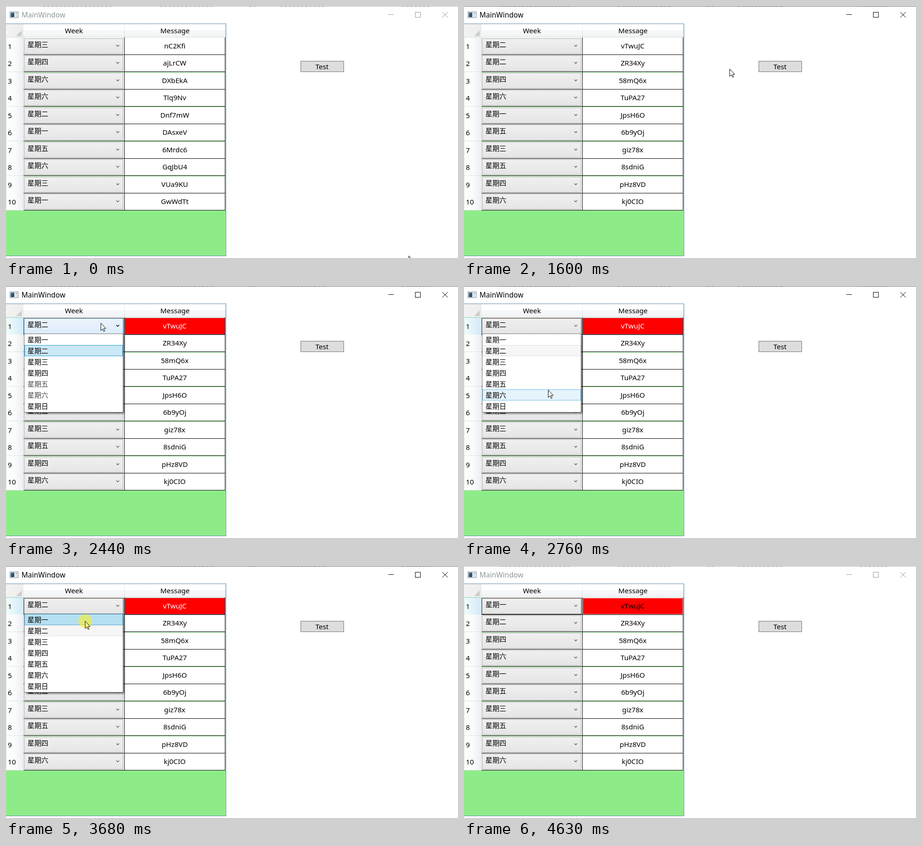
An HTML page with a canvas for the animation above (4.7 s loop, 979 by 546 pixels).

```html
<!DOCTYPE html>
<html lang="zh">
<head>
<meta charset="utf-8">
<title>MainWindow</title>
<style>
html, body { margin: 0; width: 100%; height: 100%; overflow: hidden; background: #fff; }
canvas { display: block; width: 979px; height: 546px; }
</style>
</head>
<body>
<canvas id="stage"></canvas>
<script>
const W = 979, H = 546, LOOP = 4700;
const canvas = document.getElementById('stage');
const ctx = canvas.getContext('2d');
const dpr = window.devicePixelRatio || 1;
canvas.width = W * dpr;
canvas.height = H * dpr;

const LATIN = '15.2px "Noto Sans", "Open Sans", sans-serif';
const CJK = '15px "Noto Sans CJK SC", "Noto Sans CJK", sans-serif';
const DAYS = '一二三四五六日';
const DATA = [
  { days: '三四六六二一五六三一', msgs: 'nC2Kfi ajLrCW DXbEkA Tlq9Nv Dnf7mW DAsxeV 6Mrdc6 GqJbU4 VUa9KU GwWdTt'.split(' ') },
  { days: '日一一二二四五三六一', msgs: 'PVe2Ov 8j2m7j 0yQnLj zqdDyz as3XVt ATTaqc q8xRcW SMuLsd Y2GPiW sFd6gY'.split(' ') },
  { days: '二二四六一五三五四六', msgs: 'vTwuJC ZR34Xy 58mQ6x TuPA27 JpsH6O 6b9yOj giz78x 8sdniG pHz8VD kj0CIO'.split(' ') }
];

// The screen refreshes in bursts: [first, last, count]
const BURSTS = [[0, 0, 1], [70, 500, 7], [650, 730, 2], [1280, 1280, 1], [1430, 1890, 7],
  [1980, 2440, 7], [2530, 2990, 7], [3140, 3300, 3], [3680, 4000, 5], [4630, 4630, 1]];
const TICKS = BURSTS.flatMap(([a, b, n]) =>
  Array.from({ length: n }, (_, i) => n > 1 ? Math.round((a + (b - a) * i / (n - 1)) / 10) * 10 : a));

// Pointer track: [time, x, y]
const TRACK = [[0, 872, 541], [140, 822, 420], [290, 730, 215], [430, 684, 142], [500, 680, 136],
  [1430, 680, 136], [1580, 575, 136], [1600, 575, 136], [1890, 370, 112], [2130, 220, 84], [2280, 205, 78],
  [2440, 205, 80], [2530, 203, 96], [2680, 188, 195], [2760, 182, 225], [2990, 175, 136],
  [3140, 174, 132], [3300, 171, 119], [3770, 171, 119], [4000, 602, 339]];

function pointer(t) {
  for (let i = 1; i < TRACK.length; i++) {
    const [t0, x0, y0] = TRACK[i - 1], [t1, x1, y1] = TRACK[i];
    if (t <= t1) {
      const k = (t - t0) / (t1 - t0);
      return { x: Math.round(x0 + (x1 - x0) * k), y: Math.round(y0 + (y1 - y0) * k) };
    }
  }
  const [, x, y] = TRACK[TRACK.length - 1];
  return { x, y };
}

const within = (t, a, b) => t >= a && t < b;
const inside = (p, x, y, w, h) => p.x >= x && p.x < x + w && p.y >= y && p.y < y + h;

function fill(x, y, w, h, color) {
  ctx.fillStyle = color;
  ctx.fillRect(x, y, w, h);
}

function box(x, y, w, h, color, border) {
  fill(x, y, w, h, color);
  ctx.strokeStyle = border;
  ctx.lineWidth = 1;
  ctx.strokeRect(x + .5, y + .5, w - 1, h - 1);
}

function ramp(x0, y0, x1, y1, ...colors) {
  const g = ctx.createLinearGradient(x0, y0, x1, y1);
  colors.forEach((c, i) => g.addColorStop(i / (colors.length - 1), c));
  return g;
}

function text(s, x, y, color = '#000', align = 'left', font = LATIN) {
  ctx.font = font;
  ctx.textAlign = align;
  ctx.fillStyle = color;
  ctx.fillText(s, x, y);
}

function lines(color, width, ...paths) {
  ctx.strokeStyle = color;
  ctx.lineWidth = width;
  ctx.beginPath();
  for (const p of paths) {
    ctx.moveTo(p[0], p[1]);
    for (let i = 2; i < p.length; i += 2) ctx.lineTo(p[i], p[i + 1]);
  }
  ctx.stroke();
}

function titleBar(active) {
  const ink = active ? '#000' : '#999';
  fill(0, 0, W, 1, active ? '#6b6b6b' : '#b4b4b4');
  for (const [x, w] of [[80, 150], [334, 116], [527, 10], [594, 92], [858, 58]])
    for (let i = 0; i < w; i += 9) fill(x + i, 0, 5, 1, active ? '#444' : '#777');
  box(8, 12, 19, 14, '#f4f6f8', '#8d959b');
  fill(10, 14, 8, 10, ramp(10, 14, 18, 24, '#4f7f9f', '#173a58'));
  fill(20, 14, 5, 4, '#c4c9cd');
  fill(20, 20, 5, 4, '#d5d9dc');
  text('MainWindow', 33.5, 25, active ? '#000' : '#8f9a90', 'left', LATIN.replace('15.2', '15.5'));
  lines(ink, 1, [828, 18.5, 840, 18.5], [945, 13, 957, 25], [957, 13, 945, 25]);
  ctx.strokeRect(886.5, 13.5, 11, 11);
}

function headers() {
  fill(0, 39, 38, 29, ramp(0, 39, 38, 39, '#f3f3f3', '#ececec'));
  ctx.fillStyle = '#cbcbcb';
  ctx.beginPath();
  ctx.moveTo(34, 53);
  ctx.lineTo(34, 65);
  ctx.lineTo(22, 65);
  ctx.fill();
  fill(38, 39, 437, 13, '#fff');
  fill(38, 52, 437, 16, ramp(0, 52, 0, 68, '#f8f9fb', '#f1f2f5'));
  for (const x of [256, 474]) fill(x, 40, 1, 28, ramp(0, 40, 0, 68, '#f4f4f4', '#d2d4d8'));
  fill(0, 67, 475, 1, '#d3e2d3');
  text('Week', 147, 59, '#000', 'center');
  text('Message', 366, 59, '#000', 'center');
}

function combo(y, day, hover, selected) {
  const top = hover ? '#ecf4fc' : '#f0f0f0', end = hover ? '#dcecfc' : '#e5e5e5';
  if (selected) box(38, y + 1, 217, 36, '#c3a3a3', '#5c4848');
  box(39, y + 2, 215, 34, ramp(0, y + 2, 0, y + 36, top, end), hover ? '#7eb4ea' : '#acacac');
  lines(hover ? '#000' : '#606060', 1.5, [239, y + 16.5, 242, y + 19.5, 245, y + 16.5]);
  text('星期' + day, 46.5, y + 21, '#000', 'left', CJK);
}

function row(i, day, msg, s) {
  const y = Math.floor(68 + 37.5 * i), end = Math.floor(105 + 37.5 * i);
  const sel = s.selected && i === 0;
  fill(0, y, 38, end - y + 1, sel ? ramp(0, 0, 38, 0, '#f4fbff', '#e1f3fa', '#d3eaf5')
    : ramp(0, 0, 38, 0, '#fff', '#fafbfc', '#eceef2'));
  fill(0, y, 1, end - y + 1, '#cfeecf');
  fill(0, end, 38, 1, sel ? '#9fd8dc' : '#dde3dd');
  if (sel) fill(0, y, 38, 1, '#a5dfd8');
  fill(37, y, 1, end - y, '#d5d8dc');
  text(i + 1, 4, y + 25);
  fill(38, i ? y + 1 : y, 437, end - y, '#fff');
  combo(y, day, s.hoverRow === i, sel);
  if (sel) box(257, y + 1, 217, 36, '#f00', s.active ? '#a64a55' : '#ffc0c0');
  text(msg, 365.5, y + 24, sel && s.active ? '#fff' : '#000', 'center');
  fill(38, end, 437, 1, sel && s.active ? '#0c1830' : '#000');
  for (const x of [256, 474]) fill(x, y, 1, end - y + 1, '#000');
}

function table(s) {
  fill(0, 38, 477, 504, '#8eec88');
  headers();
  const { days, msgs } = s.data;
  msgs.forEach((m, i) => row(i, s.picked && i === 0 ? '一' : days[i], m, s));
  fill(475, 39, 1, 404, '#e4f4e4');
  fill(0, 38, 477, 1, '#688caf');
  fill(476, 38, 1, 504, '#688caf');
  fill(0, 541, 477, 1, '#688caf');
}

function popup(s) {
  const h = 171 * s.open;
  ctx.save();
  ctx.shadowColor = 'rgba(0,0,0,.65)';
  ctx.shadowBlur = 4 * dpr;
  ctx.shadowOffsetX = ctx.shadowOffsetY = 2 * dpr;
  fill(41, 105, 213, h - 2, '#fff');
  ctx.restore();
  box(39, 103, 215, h, '#fff', '#767676');
  ctx.save();
  ctx.beginPath();
  ctx.rect(39, 103, 215, h);
  ctx.clip();
  const over = inside(s.p, 40, 104, 213, 168) ? Math.floor((s.p.y - 104) / 24) : -1;
  for (let i = 0; i < 7; i++) {
    const y = 104 + 24 * i;
    if (i === over && s.down) box(40, y, 213, 24, '#b5e0f2', '#5cb3dc');
    else if (i === over) box(40, y, 213, 24, i === 1 ? '#d1e8ff' : '#e5f3fb', i === 1 ? '#66a7e8' : '#70c0e7');
    else if (i === 1) box(40, y, 213, 24, over < 0 ? '#cbe8f6' : '#f6f6f6', over < 0 ? '#26a0da' : '#dedede');
    const fading = s.fading && (i === 4 || i === 5);
    text('星期' + DAYS[i], 46.5, y + 18, fading ? '#4a4a4a' : '#000', 'left', CJK);
  }
  ctx.restore();
}

function button(s) {
  const hover = inside(s.p, 638, 119, 94, 24);
  if (hover && s.down) box(638, 119, 94, 24, '#c4e5f6', '#2c628b');
  else if (hover) box(638, 119, 94, 24, '#bee6fd', '#3c7fb1');
  else box(638, 119, 94, 24, '#ddd', '#707070');
  text('Test', 684.5, 137, '#000', 'center');
}

function cursor({ x, y }, down) {
  if (down) {
    ctx.fillStyle = 'rgba(255,240,20,.55)';
    ctx.beginPath();
    ctx.arc(x + .5, y + .5, 15, 0, Math.PI * 2);
    ctx.fill();
  }
  const arrow = new Path2D('M.5 .5V16.5L4.2 13L6.6 18.5L9 17.5L6.6 12H11.3Z');
  ctx.save();
  ctx.translate(x, y);
  ctx.fillStyle = down ? '#ffff8c' : '#fff';
  ctx.fill(arrow);
  ctx.strokeStyle = '#000';
  ctx.lineWidth = 1;
  ctx.stroke(arrow);
  ctx.restore();
}

function stateAt(t) {
  const p = pointer(t);
  const open = t < 2360 || t >= 3770 ? 0 : t < 2440 ? .55 : 1;
  const onCombo = inside(p, 39, 70, 215, 372) && (!open || p.y < 104);
  return {
    p, open,
    active: within(t, 70, 4630),
    data: DATA[t < 730 ? 0 : t < 1430 ? 1 : 2],
    selected: t >= 2280,
    picked: t >= 3770,
    fading: t < 2530,
    down: within(t, 650, 730) || within(t, 1280, 1430) || within(t, 2280, 2360) || within(t, 3680, 3770),
    hoverRow: onCombo && t < 4630 ? Math.floor((p.y - 68) / 37.5) : -1,
    showCursor: t < 4630
  };
}

function draw(t) {
  const s = stateAt(t);
  ctx.setTransform(dpr, 0, 0, dpr, 0, 0);
  fill(0, 0, W, H, '#fff');
  titleBar(s.active);
  table(s);
  button(s);
  if (s.open) popup(s);
  if (s.showCursor) cursor(s.p, s.down);
}

const start = performance.now();
function frame() {
  const t = (performance.now() - start) % LOOP;
  draw(TICKS.filter(k => k <= t).pop() || 0);
  requestAnimationFrame(frame);
}
frame();
</script>
</body>
</html>
```
